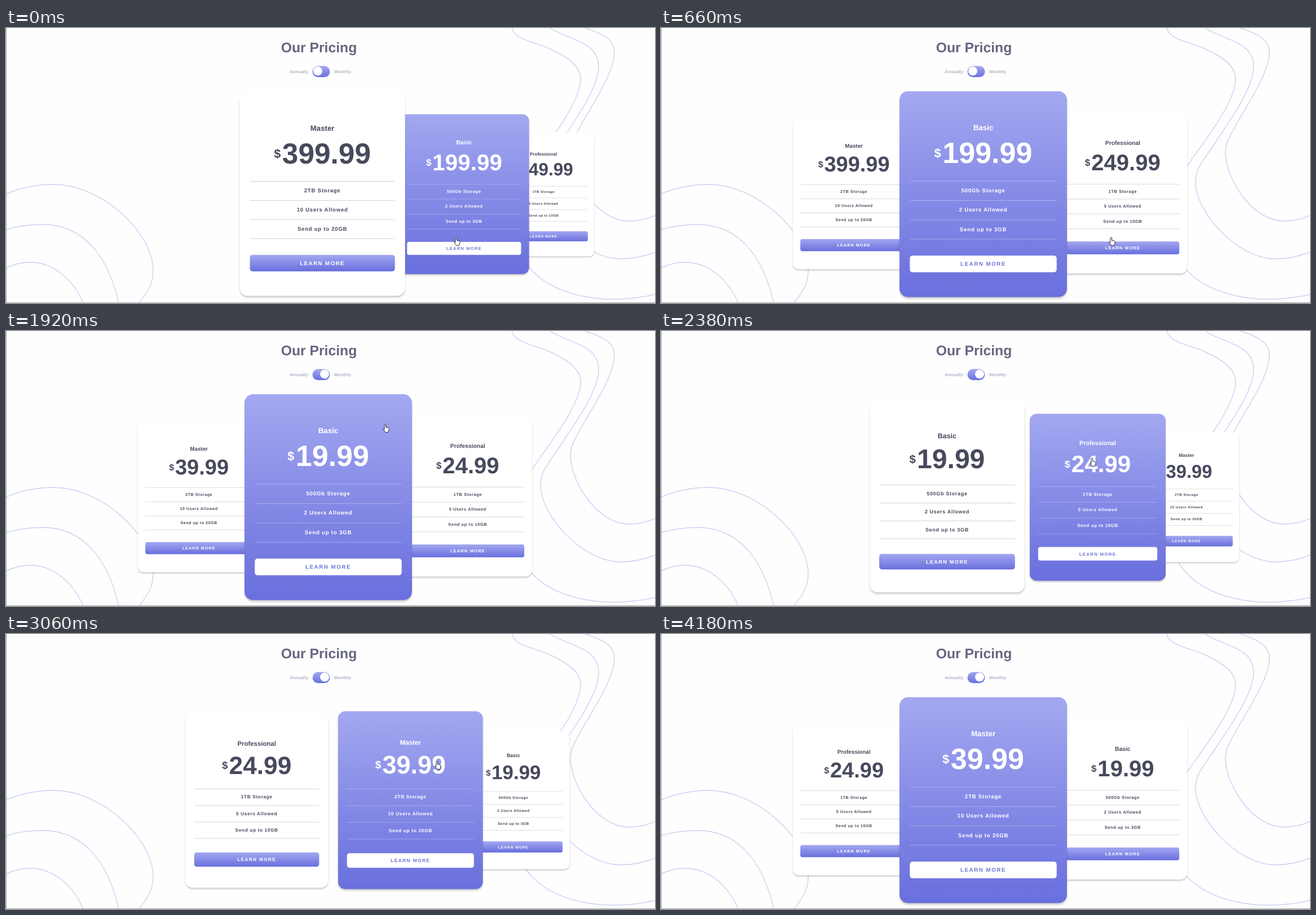
Animation of 1151x487 px, one loop 4.55 s. Source, as an HTML page:

```html
<!DOCTYPE html>
<html lang="en">
<head>
<meta charset="utf-8">
<title>Our Pricing</title>
<style>
html, body { margin: 0; width: 100%; height: 100%; overflow: hidden; background: #fefefe; }
svg { display: block; width: 100%; height: 100%; }
text { font: bold 9.7px "Liberation Sans", Arial, sans-serif; text-anchor: middle; text-rendering: geometricPrecision; }
.heading { font-size: 24.7px; fill: #64667f; }
.label { font-size: 7.85px; fill: #b2b4c6; }
.card { fill: #47495c; }
.card.active { fill: #fff; }
.panel { filter: drop-shadow(0 3px 1.6px rgba(0, 0, 0, .2)); }
.name { font-size: 13.4px; }
.price { font-size: 52px; }
.sign { font-size: 22px; }
.feature { letter-spacing: .76px; }
.action { font-size: 9.8px; letter-spacing: 1.5px; fill: #fff; }
.active .action { fill: #7075da; }
.rule { stroke: #cfcfd6; stroke-width: 1; }
.active .rule { stroke: #fff; stroke-opacity: .32; }
.waves { fill: none; stroke: #cfcff3; stroke-width: 1.4; }
#cursor { fill: #fff; stroke: #22222c; stroke-width: 1; stroke-linejoin: round; }
</style>
</head>
<body>
<svg viewBox="0 0 1151 487">
  <defs>
    <linearGradient id="violet" x2="0" y2="1">
      <stop stop-color="#a3a8f0"/>
      <stop offset="1" stop-color="#696fdd"/>
    </linearGradient>
  </defs>
  <g class="waves">
    <path d="M0 294C28 282 56 277 85 277C170 277 261 362 261 430C261 455 250 468 236 487"/>
    <path d="M0 357C20 351 42 348 65 348C135 348 180 400 200 487"/>
    <path d="M0 425C14 418 28 415 43 415C84 415 119 445 137 487"/>
    <path d="M897 0C903 22 937 24 965 37C998 52 1019 68 1019 90C1019 128 975 185 934 243C885 312 887 370 927 423C970 475 1060 492 1151 472"/>
    <path d="M965 0C992 20 1051 22 1051 68C1051 106 1010 162 985 200C960 238 948 248 948 273C948 326 1022 409 1090 409C1112 409 1133 404 1151 397"/>
    <path d="M1027 0C1052 8 1079 18 1079 42C1079 82 1036 140 1013 184C1005 198 1001 208 1001 220C1001 266 1048 342 1105 342C1122 342 1138 338 1151 332"/>
  </g>
  <path d="M.5 0V486.5H1151" fill="none" stroke="#a6a6a8"/>
  <text class="heading" x="555" y="43">Our Pricing</text>
  <text class="label" x="519.5" y="79.7">Annually</text>
  <text class="label" x="597" y="79.7">Monthly</text>
  <rect x="543.5" y="67.3" width="31" height="19.8" rx="9.9" fill="url(#violet)"/>
  <circle id="knob" cy="76.3" r="8" fill="#fff"/>
  <g id="cards"></g>
  <path id="cursor"/>
</svg>
<script>
const LOOP = 4550;
const REFRESH = 30;
const SWITCH_TIME = 1620;
const POINTER_EXIT = 4180;
const $ = id => document.getElementById(id);

const plans = [
  { name: 'Basic', yearly: '199.99', monthly: '19.99', features: ['500Gb Storage', '2 Users Allowed', 'Send up to 3GB'] },
  { name: 'Professional', yearly: '249.99', monthly: '24.99', features: ['1TB Storage', '5 Users Allowed', 'Send up to 10GB'] },
  { name: 'Master', yearly: '399.99', monthly: '39.99', features: ['2TB Storage', '10 Users Allowed', 'Send up to 20GB'] }
];

// Each slide brings the plan with the same index to the middle.
const slides = [
  { start: -22, duration: 435 },
  { start: 2295, duration: 450 },
  { start: 2928, duration: 470 }
];

const pointerMoves = [
  { start: 740, end: 1080, x: 556.5, y: 110.5 },
  { start: 1080, end: 1400, x: 548, y: 83.5 },
  { start: 1780, end: 2200, x: 764.5, y: 225.5 },
  { start: 3060, end: 3300, x: 936, y: 367.5 },
  { start: 3300, end: 3430, x: 985, y: 433 },
  { start: 3430, end: 4150, x: 890, y: 405 }
];
const HAND = 'M-1.5 8V1.2a1.3 1.3 0 0 1 2.6 0V5l4 1c1.2.3 1.7 1 1.5 2.2L6 11.5 5.2 14H0L-3.4 9.3c-.8-1.2.6-2 1.9-.3z';
const ARROW = 'M0 0V10.5L2.5 8.2 4 12 5.6 11.3 4.1 7.7H7Z';

// The CSS "ease" curve.
function ease(x) {
  if (x <= 0) return 0;
  if (x >= 1) return 1;
  const bezier = (s, a, b) => 3 * (1 - s) * s * ((1 - s) * a + s * b) + s ** 3;
  let low = 0, high = 1;
  for (let i = 0; i < 24; i++) {
    const mid = (low + high) / 2;
    if (bezier(mid, .25, .25) < x) low = mid; else high = mid;
  }
  return bezier(low, .1, 1);
}

const mix = (a, b, p) => a + (b - a) * p;
const depth = slot => 1 + .37 * Math.abs(slot) - (slot > 0 ? .072 : 0);
const text = (type, y, content) => `<text class="${type}" y="${y}">${content}</text>`;

// Cards move one slot to the left, in perspective.
function place(index, active, progress) {
  const step = (index - active + 3) % 3;
  const end = step === 2 ? -1 : step;
  const scale = 1 / mix(depth(end + 1), depth(end), progress);
  const x = 581.6 + scale * (318 * mix(end + 1, end, progress) - 10.1);
  return { index, scale, x, isActive: index === active };
}

function drawCard({ index, scale, x, isActive }, time) {
  const plan = plans[index];
  const price = time < SWITCH_TIME ? plan.yearly : plan.monthly;
  const [panel, button] = isActive ? ['url(#violet)', '#fff'] : ['#fff', 'url(#violet)'];
  const rules = [0, 1, 2, 3].map(i => `M-130.2 ${-23 + 34.2 * i}h260.4`).join('');
  return `<g class="card ${isActive ? 'active' : ''}" transform="translate(${x} 294.3) scale(${scale})">
    <rect class="panel" x="-148.5" y="-182.2" width="297" height="364.4" rx="15" fill="${panel}"/>
    ${text('name', -113.3, plan.name)}
    ${text('price', -55, `<tspan class="sign" dy="-10">$</tspan><tspan dx="2.5" dy="10">${price}</tspan>`)}
    <path class="rule" d="${rules}"/>
    ${plan.features.map((item, i) => text('feature', -3.3 + 34.3 * i, item)).join('')}
    <rect x="-130.2" y="108.7" width="260.4" height="29.6" rx="5" fill="${button}"/>
    ${text('action', 127.2, 'LEARN MORE')}
  </g>`;
}

function drawPointer(time) {
  let x = 798.5, y = 371;
  for (const move of pointerMoves) {
    const p = ease((time - move.start) / (move.end - move.start));
    x = mix(x, move.x, p);
    y = mix(y, move.y, p);
  }
  const overCards = y > 112 && x < 940;
  $('cursor').setAttribute('d', time >= POINTER_EXIT - REFRESH ? '' : overCards ? HAND : ARROW);
  $('cursor').setAttribute('transform', `translate(${x} ${y})`);
}

function draw(time) {
  const active = slides.findLastIndex(slide => slide.start <= time);
  const progress = ease((time - slides[active].start) / slides[active].duration);
  $('cards').innerHTML = plans.map((_, i) => place(i, active, progress))
    .sort((a, b) => a.scale - b.scale)
    .map(card => drawCard(card, time)).join('');
  $('knob').setAttribute('cx', mix(553, 565, ease((time - SWITCH_TIME + 30) / 330)));
  drawPointer(time);
}

const begin = performance.now();
let shown = -1;
function frame() {
  const now = (performance.now() - begin) % LOOP;
  const time = Math.floor(now / REFRESH) * REFRESH;
  if (time !== shown) draw(shown = time);
  requestAnimationFrame(frame);
}
frame();
</script>
</body>
</html>
```
